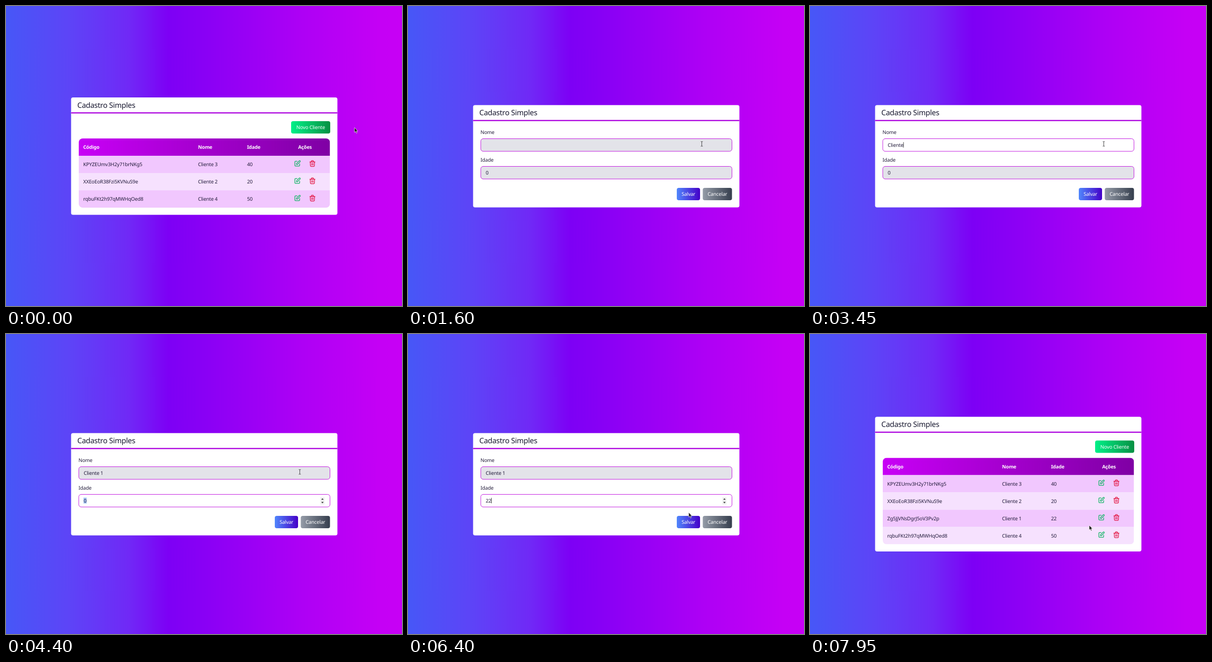
An HTML page for the animation above (8000 ms loop, 800x607 px).

```html
<!DOCTYPE html>
<html lang="pt">
<head>
<meta charset="utf-8">
<title>Cadastro Simples</title>
<style>
  html, body { margin: 0; width: 100%; height: 100%; overflow: hidden; }
  svg { display: block; width: 100%; height: 100%; }
  text {
    font: 10.1px "Noto Sans", "Open Sans", sans-serif;
    letter-spacing: -.02em; fill: #231c3b;
    white-space: pre; text-rendering: geometricPrecision;
  }
  .title { font-size: 15px; fill: #17172f; }
  .head { font-size: 9.8px; font-weight: 700; fill: #fff; }
  .button { fill: #fff; }
  .icon { fill: none; stroke-width: 2; stroke-linecap: round; stroke-linejoin: round; }
</style>
</head>
<body>
<svg id="stage" viewBox="0 0 800 607" preserveAspectRatio="none"></svg>
<script>
const LOOP = 8000, FORM_OPENS = 1200, FORM_CLOSES = 7150;
const NAME_FOCUS = 1900, AGE_FOCUS = 3900;

const EDIT = 'M11 5H6a2 2 0 00-2 2v11a2 2 0 002 2h11a2 2 0 002-2v-5m-1.414-9.414a2 2 0 112.828 2.828L11.828 15H9v-2.828l8.586-8.586z';
const TRASH = 'M19 7l-.867 12.142A2 2 0 0116.138 21H7.862a2 2 0 01-1.995-1.858L5 7m5 4v6m4-6v6m1-10V4a1 1 0 00-1-1h-4a1 1 0 00-1 1v3M4 7h16';

const clients = [
  ['KPYZEUmv3H2y71brNKg5', 'Cliente 3', 40],
  ['XXEoEoR38Fzi5KVNuS9e', 'Cliente 2', 20],
  ['rqbuFKt2h97qMWHqOed8', 'Cliente 4', 50]
];
const added = ['Zg5JjVNsDgrJ5oV3Pv2p', 'Cliente 1', 22];
const allClients = [...clients.slice(0, 2), added, clients[2]];

// Keystrokes: [time, value of the field from then on]
const nameKeys = [[0, ''], ...[...'Cliente'].map((_, i) => [2450 + i * 150, 'Cliente'.slice(0, i + 1)]),
  [3550, 'Cliente '], [3700, 'Cliente 1']];
const ageKeys = [[0, '0'], [4500, '2'], [4950, '22']];

// Pointer path: [time, x, y]
const pointerPath = [
  [0, 704, 246], [50, 704, 246], [850, 620, 243], [1200, 620, 243], [1550, 593.5, 279],
  [5800, 593.5, 279], [6400, 567, 361], [6600, 566, 376], [7000, 566, 378], [7300, 564, 387], [LOOP, 564, 387]
];

const text = (x, y, value, cls = '', extra = '') => `<text x="${x}" y="${y}" class="${cls}" ${extra}>${value}</text>`;
const rect = (x, y, w, h, fill, r = 0, extra = '') =>
  `<rect x="${x}" y="${y}" width="${w}" height="${h}" rx="${r}" fill="${fill}" ${extra}/>`;
const gradient = (id, ...stops) => `<linearGradient id="${id}">` +
  stops.map(([at, color]) => `<stop offset="${at}" stop-color="${color}"/>`).join('') + '</linearGradient>';
const icon = (x, y, path, color) =>
  `<path class="icon" transform="translate(${x} ${y}) scale(.645)" stroke="${color}" d="${path}"/>`;
const button = (x, y, w, fill, label) => rect(x, y, w, 25, `url(#${fill})`, 4) +
  text(x + w / 2, y + 16, label, 'button', 'text-anchor="middle"');

const card = (top, height) => rect(131.5, top, 538, height, '#fff', 4) +
  text(144, top + 20.5, 'Cadastro Simples', 'title') + rect(131.5, top + 30, 538, 2.5, '#b00de0');

function tableRow([code, name, age], i, top) {
  const y = top + 118 + i * 35;
  return rect(147, y, 507.5, 35, i % 2 ? '#f6e1fe' : '#f1c7fe') +
    text(156, y + 21, code) + text(388, y + 21, name) + text(487, y + 21, age) +
    icon(581, y + 8, EDIT, '#0db463') + icon(611.3, y + 8, TRASH, '#e2123f');
}

function list(id, rows) {
  const height = 132.5 + rows.length * 35, top = 303.75 - height / 2, head = top + 104;
  return `<g id="${id}">${card(top, height)}${button(576, top + 48, 79, 'green', 'Novo Cliente')}
    <clipPath id="${id}Clip">${rect(147, top + 83, 507.5, 35 + rows.length * 35, '#000', 8)}</clipPath>
    <g clip-path="url(#${id}Clip)">${rect(147, top + 83, 507.5, 35, 'url(#header)')}
    ${text(156, head, 'Código', 'head')}${text(388, head, 'Nome', 'head')}
    ${text(487, head, 'Idade', 'head')}${text(604, head, 'Ações', 'head', 'text-anchor="middle"')}
    ${rows.map((row, i) => tableRow(row, i, top)).join('')}</g></g>`;
}

const field = (id, label, y) => text(146.5, y - 9, label) +
  rect(147, y + .5, 507.5, 25.5, '#e3e3e9', 5, `id="${id}Box" stroke="#c31be0"`) +
  rect(156.5, y + 7, 6.5, 12, '#a8c7fa', 0, `id="${id}Selection" visibility="hidden"`) +
  text(157, y + 17, '', '', `id="${id}"`);

const form = `<g id="form">${card(200.5, 207)}
  ${field('nome', 'Nome', 268)}${field('idade', 'Idade', 324)}
  <g id="spinner">${rect(635, 330, 8.5, 15, '#f1f1f1')}
    <path d="M636.8 335.2l2.5-2.8 2.5 2.8zM636.8 339.8l2.5 2.8 2.5-2.8z" fill="#333"/></g>
  ${rect(0, 0, .9, 11, '#222', 0, 'id="caret"')}
  ${button(543, 368, 47, 'blue', 'Salvar')}${button(595.5, 368, 59, 'gray', 'Cancelar')}</g>`;

const pointers = `<g id="pointer">
  <path id="arrow" d="M0 0V9.6L2.2 7.7 3.8 11.3 5.4 10.5 3.9 7.1H6.7Z" fill="#1a1a1a" stroke="#fff" stroke-width=".7"/>
  <path id="hand" d="M-.9 .7Q0-.3.9.7V4.3Q2 3.5 2.8 4.5 3.9 4 4.5 5 5.7 4.6 6.1 5.8V8.6L5 11.7H-.2L-2.6 7.8Q-3.2 6.4-2 6.4L-.9 7.5Z" fill="#fff" stroke="#111" stroke-width=".8"/>
  <path id="beam" d="M-2-4.7H-.4L0-4.3 .4-4.7H2M0-4.3V4.3M-2 4.7H-.4L0 4.3 .4 4.7H2" fill="none" stroke="#333" stroke-width=".9"/>
</g>`;

document.getElementById('stage').innerHTML = `<defs>
  ${gradient('sky', [0, '#4757f7'], [.16, '#5d44f7'], [.31, '#7029f6'], [.41, '#7d00f5'], [.5, '#8900f5'], [.75, '#ae00f5'], [.95, '#c500f5'], [1, '#c700f5'])}
  ${gradient('header', [0, '#c800f6'], [1, '#7f00a4'])}
  ${gradient('green', [0, '#00f088'], [1, '#079043'])}
  ${gradient('blue', [0, '#5087fc'], [1, '#4400c8'])}
  ${gradient('gray', [0, '#959ca8'], [1, '#353e4d'])}
  </defs>${rect(0, 0, 800, 607, 'url(#sky)')}
  ${list('before', clients)}${list('after', allClients)}${form}${pointers}`;

const $ = id => document.getElementById(id);
const show = (id, on) => $(id).setAttribute('visibility', on ? 'inherit' : 'hidden');
const lastKey = (keys, t) => keys.filter(([at]) => at <= t).pop();

function pointerAt(t) {
  const i = pointerPath.findIndex(([at]) => at > t);
  const [t0, x0, y0] = pointerPath[i - 1], [t1, x1, y1] = pointerPath[i];
  const p = (t - t0) / (t1 - t0), e = p * p * (3 - 2 * p);
  return [x0 + (x1 - x0) * e, y0 + (y1 - y0) * e];
}

function pointerKind(x, y, inForm) {
  const inside = (l, t, r, b) => x >= l && x <= r && y >= t && y <= b;
  if (!inForm) return inside(576, 233, 655, 258) ? 'hand' : 'arrow';
  if (inside(147, 268, 655, 294) || inside(147, 324, 655, 350)) return 'beam';
  return inside(543, 368, 590, 393) || inside(595, 368, 655, 393) ? 'hand' : 'arrow';
}

function render(t) {
  const inForm = t >= FORM_OPENS && t < FORM_CLOSES;
  show('before', t < FORM_OPENS);
  show('form', inForm);
  show('after', t >= FORM_CLOSES);

  const onAge = t >= AGE_FOCUS, onName = t >= NAME_FOCUS && !onAge;
  const [nameTime, name] = lastKey(nameKeys, t), [ageTime, age] = lastKey(ageKeys, t);
  $('nome').textContent = name;
  $('idade').textContent = age;
  $('nomeBox').setAttribute('fill', onName ? '#fff' : '#e3e3e9');
  $('idadeBox').setAttribute('fill', onAge ? '#fff' : '#e3e3e9');
  const selected = onAge && !ageTime;
  show('idadeSelection', selected);
  show('spinner', onAge);

  const since = onAge ? ageTime : Math.max(nameTime, NAME_FOCUS);
  show('caret', (onName || onAge) && !selected && (t - since) % 1000 < 500);
  $('caret').setAttribute('x', 157 + $(onAge ? 'idade' : 'nome').getComputedTextLength());
  $('caret').setAttribute('y', onAge ? 331.5 : 275.5);

  const [x, y] = pointerAt(t), kind = pointerKind(x, y, inForm);
  $('pointer').setAttribute('transform', `translate(${x} ${y})`);
  for (const id of ['arrow', 'hand', 'beam']) show(id, id === kind);
}

function tick() {
  render(performance.now() % LOOP);
  requestAnimationFrame(tick);
}
tick();
</script>
</body>
</html>
```
